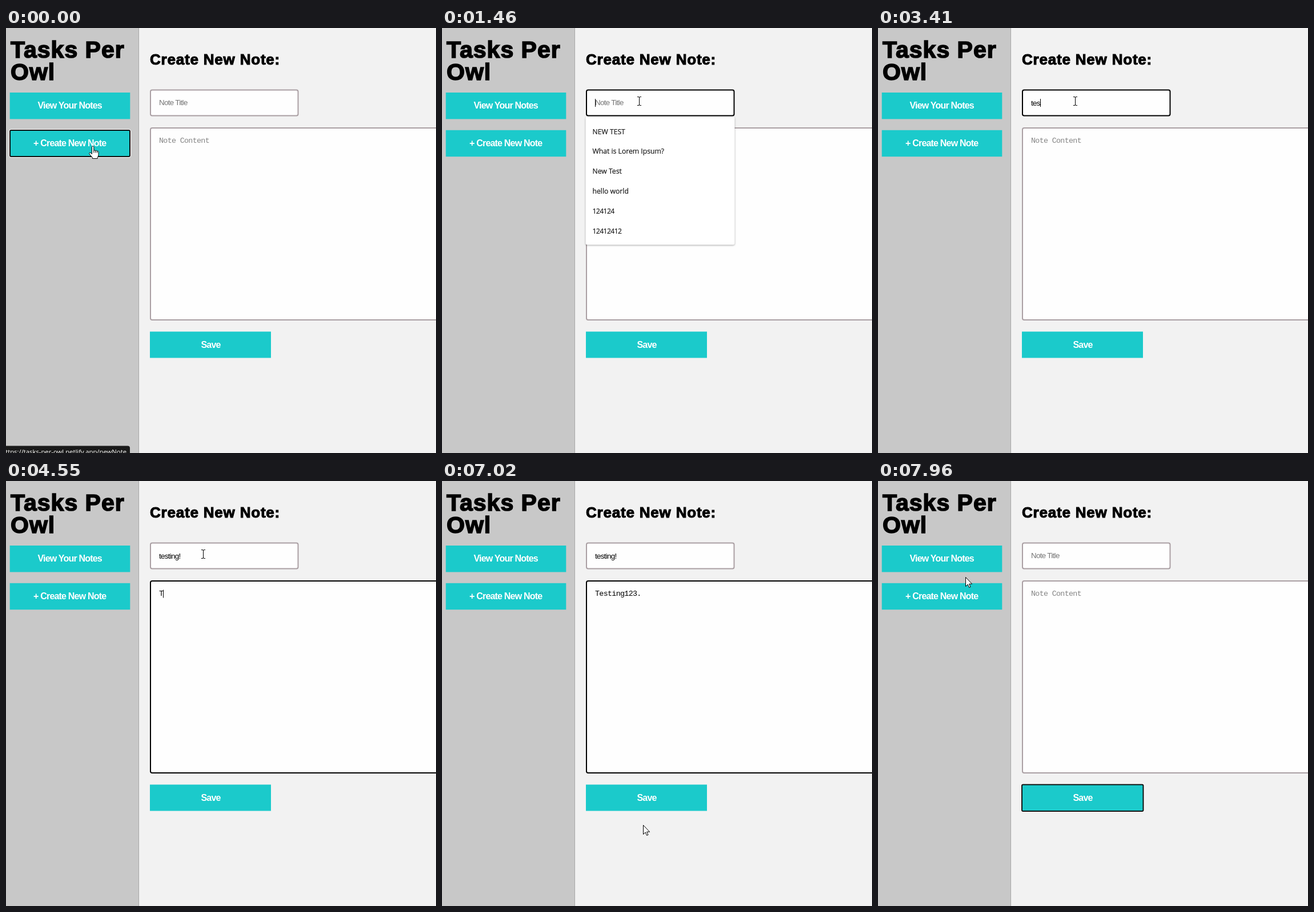
These frames come from a looping animation (753x744 px, 7990 ms). An HTML page:

```html
<!DOCTYPE html>
<html lang="en">
<head>
<meta charset="utf-8">
<title>Notes app</title>
<style>
  html, body { margin: 0; width: 100%; height: 100%; overflow: hidden; background: #f2f2f2; }
  svg { display: block; width: 753px; height: 744px; }
  text { white-space: pre; }
  .head { font: bold 41px "Liberation Sans", Arial, sans-serif; letter-spacing: 1px; stroke: #000; stroke-width: 1.6px; }
  .sub { font-size: 26px; letter-spacing: .8px; stroke-width: 1.1px; }
  .btn rect { fill: #1bcacb; }
  .btn text { font: bold 16px "Liberation Sans", Arial, sans-serif; letter-spacing: -.05em; fill: #fff; text-anchor: middle; }
  .btn .halo { stroke: #fff; stroke-width: 4px; }
  .btn .ring { stroke: #101010; stroke-width: 2px; }
  .field rect { fill: #fefefe; stroke: #aa9fa3; stroke-width: 2px; }
  .field.on rect { stroke: #000; }
  .field text { font: 13.33px "Liberation Sans", Arial, sans-serif; letter-spacing: -.05em; }
  .field.mono text { font-family: "Liberation Mono", "Courier New", monospace; }
  .field .hint { fill: #757575; }
  .field.mono .hint { fill: #858585; }
  .ui { font: 12.2px "Open Sans", "Noto Sans", sans-serif; fill: #1a1a1a; }
  #menu rect { fill: #fff; filter: drop-shadow(0 1px 1.5px rgba(0, 0, 0, .35)); }
  #menu text { stroke: #1a1a1a; stroke-width: .2px; }
  #menu .num { letter-spacing: -.6px; }
  #status text { font-size: 11.3px; fill: #fff; text-anchor: end; }
  #cursor path { stroke: #000; stroke-linejoin: round; fill: #fff; }
</style>
</head>
<body>
<svg viewBox="0 0 753 744">
  <rect width="753" height="744" fill="#f2f2f2"/>
  <rect width="232" height="744" fill="#c8c8c8"/>
  <rect x="232" width="1" height="744" fill="#a8a8a8"/>

  <text class="head" x="8" y="52">Tasks Per</text>
  <text class="head" x="8" y="91">Owl</text>
  <text class="head sub" x="252" y="64">Create New Note:</text>

  <g class="btn">
    <rect x="6.7" y="113" width="210.6" height="46.4"/>
    <text x="111.7" y="141">View Your Notes</text>
  </g>
  <g class="btn">
    <rect x="6.7" y="178.8" width="210.6" height="46.4"/>
    <g id="createRing">
      <rect class="halo" x="7" y="179" width="210" height="46" rx="2"/>
      <rect class="ring" x="7" y="179" width="210" height="46" rx="2"/>
    </g>
    <text x="111.7" y="207">+ Create New Note</text>
  </g>
  <g class="btn">
    <rect x="252" y="531.5" width="212" height="46"/>
    <g id="saveRing">
      <rect class="halo" x="252" y="531.5" width="212.5" height="46.5" rx="2"/>
      <rect class="ring" x="252" y="531.5" width="212.5" height="46.5" rx="2"/>
    </g>
    <text x="358.5" y="559.5">Save</text>
  </g>

  <g class="field" id="title">
    <rect x="253" y="108.5" width="258.5" height="45" rx="3"/>
    <text class="hint" x="268" y="135">Note Title</text>
    <text class="value" x="268" y="135.5"></text>
  </g>
  <g class="field mono" id="content">
    <rect x="253" y="175" width="520" height="336" rx="3"/>
    <text class="hint" x="268" y="201">Note Content</text>
    <text class="value" x="268" y="201"></text>
  </g>
  <rect id="caret" width="1" height="14"/>

  <g id="menu" class="ui">
    <rect x="251.5" y="155" width="261" height="224.5" rx="3"/>
  </g>

  <g id="status" class="ui">
    <path d="M0 731.5H213a4 4 0 0 1 4 4V744H0Z"/>
    <text x="211" y="745.8">https://tasks-per-owl.netlify.app/newNote</text>
  </g>

  <g id="cursor">
    <g id="arrow"><path d="M.5 .5V16.5L4.2 13 6.6 18.5 9 17.4 6.6 12.2H11.6Z"/></g>
    <g id="hand">
      <path d="M-1.6 13V1.5a1.7 1.7 0 0 1 3.4 0V7.5q1.6-1.2 3 .4q1.6-1 2.8 .6q2-.8 2.4 1.2V14.5q0 3-1.8 5V21.5H-.6V20L-5.6 14q-1.6-2 .2-2.8q1.4-.4 3.8 2.4Z"/>
      <path d="M1.8 7.5v4M4.8 8v3.5M7.6 8.6v3"/>
    </g>
    <g id="beam"><path d="M-3.5-7.5H-1.5Q0-7.5 0-6Q0-7.5 1.5-7.5H3.5M0-6.5V6.5M-3.5 7.5H-1.5Q0 7.5 0 6Q0 7.5 1.5 7.5H3.5" style="fill:none"/></g>
  </g>
</svg>
<script>
const LOOP = 7990, BLINK = 530;
const CLICK = 390, MENU = 470, TAB = 4220, SAVE = 7360;
const $ = id => document.getElementById(id);
const show = (id, on) => { $(id).style.display = on ? '' : 'none'; };
const clamp = v => Math.max(0, Math.min(1, v));

const suggestions = ['NEW TEST', 'What is Lorem Ipsum?', 'New Test', 'hello world', '124124', '12412412'];
suggestions.forEach((label, i) => {
  const el = document.createElementNS('http://www.w3.org/2000/svg', 'text');
  el.textContent = label;
  el.setAttribute('x', 263.5);
  el.setAttribute('y', 185.5 + i * 34.8);
  if (/^\d/.test(label)) el.setAttribute('class', 'num');
  $('menu').append(el);
});

const fields = {
  title: { text: 'testing!', keys: [2450, 3190, 3410, 3470, 3620, 3660, 3700, 3940], from: CLICK, to: TAB, caretY: 124 },
  content: { text: 'Testing123.', keys: [4550, 4710, 4920, 5010, 5230, 5310, 5380, 5720, 5800, 5890, 6070], from: TAB, to: SAVE, caretY: 190.5 }
};

// Pointer waypoints: time, x, y
const route = [
  [0, 152, 207], [80, 152, 207], [350, 345, 128], [6610, 345, 128],
  [7000, 353, 604], [7230, 351, 548], [7580, 351, 548], [7955, 153, 168], [LOOP, 153, 168]
];

function pointerAt(t) {
  const i = route.findIndex(p => p[0] > t);
  const [t0, x0, y0] = route[i - 1], [t1, x1, y1] = route[i];
  const u = (t - t0) / (t1 - t0), k = u * u * (3 - 2 * u);
  return [x0 + (x1 - x0) * k, y0 + (y1 - y0) * k];
}

function pointerKind(x, y) {
  const inside = (l, t, r, b) => x >= l && x < r && y >= t && y < b;
  if (inside(7, 113, 217, 159) || inside(7, 179, 217, 225) || inside(252, 531, 464, 578)) return 'hand';
  if (inside(252, 107, 512, 155) || inside(252, 174, 753, 512)) return 'beam';
  return 'arrow';
}

function drawField(id, t) {
  const f = fields[id], value = $(id).querySelector('.value');
  const typed = f.keys.filter(k => k <= t);
  const text = t < SAVE ? f.text.slice(0, typed.length) : '';
  const focused = t >= f.from && t < f.to;
  if (value.textContent !== text) value.textContent = text;
  $(id).querySelector('.hint').style.display = text ? 'none' : '';
  $(id).classList.toggle('on', focused);
  if (!focused) return false;
  const last = typed.length ? typed[typed.length - 1] : f.from;
  const width = text ? value.getComputedTextLength() : 0;
  $('caret').setAttribute('x', Math.round(268 + width));
  $('caret').setAttribute('y', f.caretY);
  return Math.floor((t - last) / BLINK) % 2 === 0;
}

function draw(t) {
  const carets = Object.keys(fields).map(id => drawField(id, t));
  show('caret', carets.some(Boolean));
  show('createRing', t < CLICK);
  show('saveRing', t >= SAVE);
  show('menu', t >= MENU && t < fields.title.keys[0]);
  $('status').style.opacity = 1 - clamp((t - 360) / 200);

  const [x, y] = pointerAt(t), kind = pointerKind(x, y);
  const snap = kind === 'beam' ? .5 : 0;
  $('cursor').setAttribute('transform', `translate(${Math.floor(x) + snap} ${Math.floor(y)})`);
  ['arrow', 'hand', 'beam'].forEach(k => show(k, k === kind));
}

const start = performance.now();
function tick() {
  draw((performance.now() - start) % LOOP);
  requestAnimationFrame(tick);
}
tick();
</script>
</body>
</html>
```
